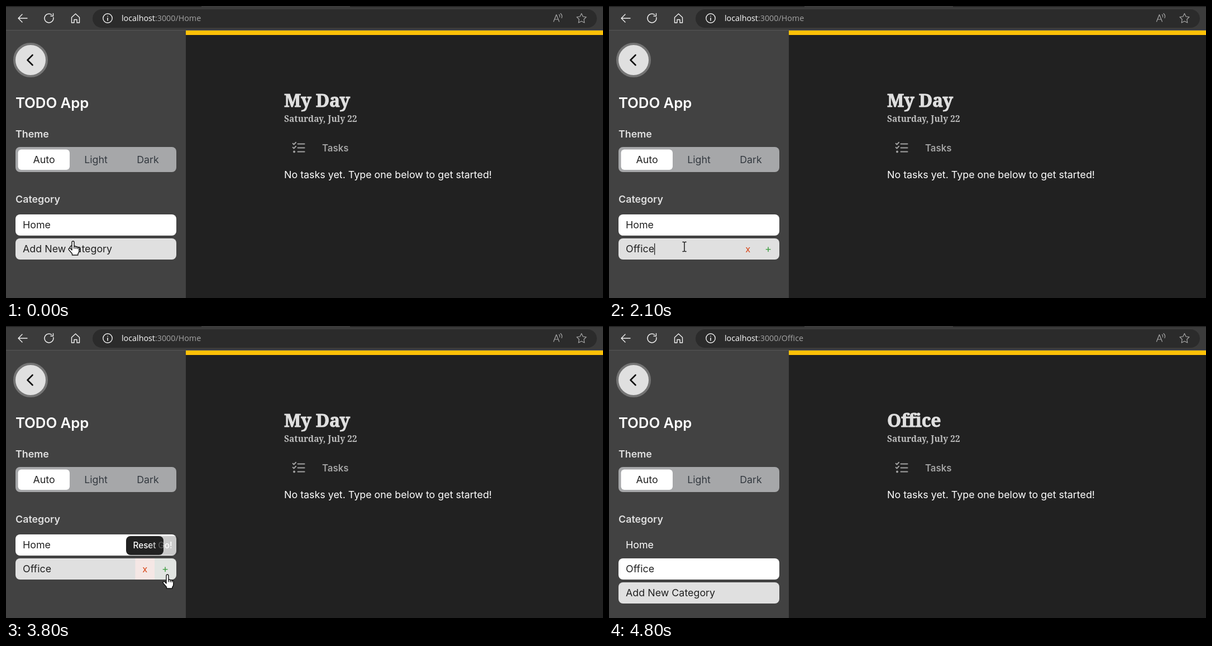
Animation, 1069 px wide and 524 px high, one loop 8000 ms. Source, as an HTML page:

```html
<!DOCTYPE html>
<html lang="en">
<head>
<meta charset="utf-8">
<title>TODO App</title>
<style>
  html, body { margin: 0; width: 100%; height: 100%; overflow: hidden; background: #212121; }
  svg { display: block; width: 1069px; height: 524px; }
  text { font: 17.85px Inter, "Open Sans", sans-serif; fill: #212121; white-space: pre; }
  .line { fill: none; stroke-linecap: round; stroke-linejoin: round; }
  .url { font: 14.3px "Open Sans", "Noto Sans", sans-serif; fill: #a3a3a3; }
  .app { font-size: 25.8px; font-weight: 600; fill: #fff; letter-spacing: -.1px; }
  .label { font-weight: 600; fill: #e0e0e0; }
  .title { font: 900 32px "Noto Serif", "DejaVu Serif", serif; fill: #e0e0e0; stroke: #e0e0e0; stroke-width: .9px; letter-spacing: -.2px; }
  .date { font: 700 15.5px "Noto Serif", "DejaVu Serif", serif; fill: #bdbdbd; }
  .tip text { font-size: 15.3px; font-weight: 500; fill: #fff; text-anchor: middle; }
  .mid { text-anchor: middle; }
</style>
</head>
<body>
<svg viewBox="0 0 1069 524">
  <defs>
    <clipPath id="rowClip"><rect x="17" width="288" height="38" rx="8"/></clipPath>
  </defs>

  <rect width="1069" height="524" fill="#212121"/>
  <rect y="43" width="322" height="481" fill="#424242"/>

  <!-- browser bar -->
  <rect width="1069" height="44" fill="#3b3b3b"/>
  <path d="M0 0H350V1.5H0zM616 0H1069V1.5H616z" fill="#1f1f1f"/>
  <rect y="43" width="1069" height="1" fill="#565656"/>
  <rect x="155" y="6" width="903" height="33" rx="16.5" fill="#2b2b2b"/>
  <g class="line" stroke="#f2f2f2" stroke-width="1.4">
    <path d="M38 22H22M29 15L22 22L29 29"/>
    <path d="M84.8 20.5A8 8 0 1 1 81.5 15.4M84.5 13.5V18H80"/>
    <path d="M117.5 20.5L124.5 14L131.5 20.5V30H127V24.5H122V30H117.5z"/>
    <circle cx="182" cy="22" r="8.2"/>
    <path d="M182 21.5V26M182 18.3V18.4" stroke-width="1.6"/>
  </g>
  <g class="line" stroke="#a8a8a8" stroke-width="1.2">
    <path d="M980.5 28L985.5 15.5L990.5 28M982.3 24H988.8M990.5 15.5Q992.5 17.5 991.5 20M993 13.5Q997 17 995 21.5"/>
    <path d="M1030.5 13.5L1033.2 19L1039 19.8L1034.8 24L1035.8 30L1030.5 27.2L1025.2 30L1026.2 24L1022 19.8L1027.8 19z"/>
  </g>
  <text class="url" x="207" y="27"><tspan fill="#fff">localhost</tspan>:3000/<tspan id="route"></tspan></text>

  <!-- main pane -->
  <rect x="322" y="44" width="747" height="8" fill="#ffc107"/>
  <text class="title" id="title" x="498" y="181"></text>
  <text class="date" x="498" y="208">Saturday, July 22</text>
  <g class="line" stroke="#a3a3a3" stroke-width="2">
    <path d="M522.5 247.5H534.5M522.5 254.5H534.5M522.5 261.5H534.5M513.7 246.8L515.5 248.6L519 244.8M513.7 253.8L515.5 255.6L519 251.8"/>
    <circle cx="516" cy="261.5" r="1"/>
  </g>
  <text x="566" y="261" style="font-size:16.8px;font-weight:600;fill:#a3a3a3">Tasks</text>
  <text x="498" y="309" style="fill:#fff">No tasks yet. Type one below to get started!</text>

  <!-- sidebar -->
  <circle cx="44" cy="97" r="29" fill="#e0e0e0" stroke="#757575" stroke-width="4"/>
  <path class="line" d="M47.5 88L38.5 97L47.5 106" stroke="#111" stroke-width="2.6"/>
  <text class="app" x="17" y="183">TODO App</text>
  <text class="label" x="17" y="236">Theme</text>
  <rect x="17" y="253" width="288" height="45" rx="8" fill="#a6a7a9"/>
  <rect x="21.5" y="257.5" width="92.5" height="36.5" rx="6" fill="#fff"/>
  <g class="mid">
    <text x="68" y="282">Auto</text>
    <text x="161" y="282" style="fill:#343a40">Light</text>
    <text x="254" y="282" style="fill:#343a40">Dark</text>
  </g>
  <text class="label" x="17" y="352.5">Category</text>

  <rect id="homeRow" x="17" y="374" width="288" height="38" rx="8" fill="#fff"/>
  <text id="homeText" x="30" y="399">Home</text>

  <g id="officeRow">
    <rect x="17" y="417" width="288" height="38" rx="8" fill="#fff"/>
    <text x="30" y="442">Office</text>
  </g>

  <g id="addRow">
    <g clip-path="url(#rowClip)">
      <rect x="17" width="288" height="38" fill="#e0e0e0"/>
      <rect id="resetBack" x="231.5" width="34.5" height="38" fill="#fbe9e7"/>
      <rect id="goBack" x="266" width="39" height="38" fill="#e8f5e9"/>
      <circle id="ripple"/>
    </g>
    <text id="entry" x="30" y="25"></text>
    <rect id="caret" y="9" width="1.2" height="20.5" fill="#111"/>
    <g id="buttons" class="mid">
      <text x="248.7" y="25" style="fill:#d84315;font-size:16.5px">x</text>
      <text x="285" y="25" style="fill:#43a047;font-size:18.5px">+</text>
    </g>
  </g>

  <g class="tip" id="resetTip">
    <rect x="215" y="377" width="67" height="34" rx="8" fill="#212121"/>
    <text x="248" y="399">Reset</text>
  </g>
  <g class="tip" id="goTip">
    <rect x="260" y="377" width="50" height="34" rx="8" fill="#212121"/>
    <text x="285" y="399">Go!</text>
  </g>

  <g id="hand" stroke="#111" stroke-width="1.4" stroke-linejoin="round">
    <path fill="#fff" d="M-2 16V2a2 2 0 0 1 4 0V9.5q2-1.3 3.3.6 2-1 3 .8 2.5-.5 2.5 2V18q0 3-2 4.5V25H-1.5V22.5L-7.5 15.5q-1-2 .8-2.8 1.5-.4 2.7 1z"/>
    <path fill="none" d="M2 9.5V13.5M5.3 10.2V13.8M8.3 11V14"/>
  </g>
  <path id="beam" class="line" stroke="#1a1a1a" stroke-width="1.5" d="M-3 -8.5H-1.2L0 -7.7L1.2 -8.5H3M0 -7.7V7.7M-3 8.5H-1.2L0 7.7L1.2 8.5H3"/>
</svg>

<script>
const LOOP = 8000, BLINK = 530, FOCUS = 500, SUBMIT = 4360;
const ui = {};
document.querySelectorAll('svg [id]').forEach(el => ui[el.id] = el);

const clamp = v => Math.max(0, Math.min(1, v));
const set = (el, attrs) => { for (const k in attrs) el.setAttribute(k, attrs[k]); };
const show = (el, opacity) => set(el, { opacity: +opacity });
const write = (el, text) => { if (el.textContent !== text) el.textContent = text; };

// cubic-bezier(.4, 0, .2, 1)
function ease(p) {
  if (p <= 0 || p >= 1) return clamp(p);
  let lo = 0, hi = 1, s;
  for (let i = 0; i < 20; i++) {
    s = (lo + hi) / 2;
    const x = 1.2 * (1 - s) ** 2 * s + .6 * (1 - s) * s * s + s ** 3;
    if (x < p) lo = s; else hi = s;
  }
  return 3 * (1 - s) * s * s + s ** 3;
}
const ramp = (t, start, length) => ease((t - start) / length);
const pulse = (t, on, onTime, off, offTime) => ramp(t, on, onTime) * (1 - ramp(t, off, offTime));

// time, x, y of the pointer
const path = [
  [30, 120, 422], [170, 133, 429], [500, 133, 429], [530, 135, 432],
  [2970, 135, 432], [3100, 190, 439], [3200, 229, 444],
  [3350, 229, 444], [3430, 240, 440], [3500, 249, 439], [3700, 250, 440],
  [3740, 266, 443], [3800, 289, 446], [4500, 289, 446], [4760, 283, 492]
];
function pointer(t) {
  const i = path.findIndex(p => p[0] > t);
  if (i === 0) return path[0].slice(1);
  if (i < 0) return path[path.length - 1].slice(1);
  const [a, b] = [path[i - 1], path[i]], k = (t - a[0]) / (b[0] - a[0]);
  return [a[1] + (b[1] - a[1]) * k, a[2] + (b[2] - a[2]) * k];
}

const keys = [1400, 1600, 1730, 1870, 1970, 2100];
const ripples = [
  { start: 480, up: 500, fade: 550, x: 131, y: 15, radius: 175 },
  { start: 4240, up: SUBMIT, fade: 400, x: 288, y: 30, radius: 274 }
];

function render(t) {
  const editing = t >= FOCUS && t < SUBMIT, done = t >= SUBMIT;
  const typed = keys.filter(k => k <= t).length;

  write(ui.title, done ? 'Office' : 'My Day');
  write(ui.route, t >= 4500 ? 'Office' : 'Home');
  write(ui.entry, editing ? 'Office'.slice(0, typed) : 'Add New Category');

  const off = ramp(t, 4430, 250);
  show(ui.homeRow, 1 - off);
  const tone = Math.round(33 + 222 * off);
  ui.homeText.style.fill = `rgb(${tone},${tone},${tone})`;
  show(ui.officeRow, done);
  set(ui.addRow, { transform: `translate(0 ${done ? 460 : 417})` });

  const lastInput = typed ? keys[typed - 1] : FOCUS;
  show(ui.caret, editing && Math.floor((t - lastInput) / BLINK) % 2 === 0);
  set(ui.caret, { x: 30 + (editing && typed ? ui.entry.getComputedTextLength() : 0) });
  show(ui.buttons, editing && typed > 0);
  show(ui.resetBack, editing * pulse(t, 3430, 250, 3740, 250));
  show(ui.goBack, editing * ramp(t, 3740, 250));
  show(ui.resetTip, editing * pulse(t, 3500, 200, 3800, 195));
  show(ui.goTip, editing * ramp(t, 3745, 225));

  const r = t < 3000 ? ripples[0] : ripples[1];
  const grow = ramp(t, r.start, 550);
  set(ui.ripple, { cx: r.x, cy: r.y, r: r.radius * grow });
  show(ui.ripple, (.1 + .2 * grow) * (1 - ramp(t, r.up, r.fade)));

  const [x, y] = pointer(t);
  const beam = t >= FOCUS && t < 3420;
  set(ui.hand, { transform: `translate(${x} ${y})` });
  set(ui.beam, { transform: `translate(${x} ${y})` });
  show(ui.beam, beam);
  show(ui.hand, !beam && t < 4770);
}

const begin = performance.now();
function tick() {
  render((performance.now() - begin) % LOOP);
  requestAnimationFrame(tick);
}
tick();
</script>
</body>
</html>
```
